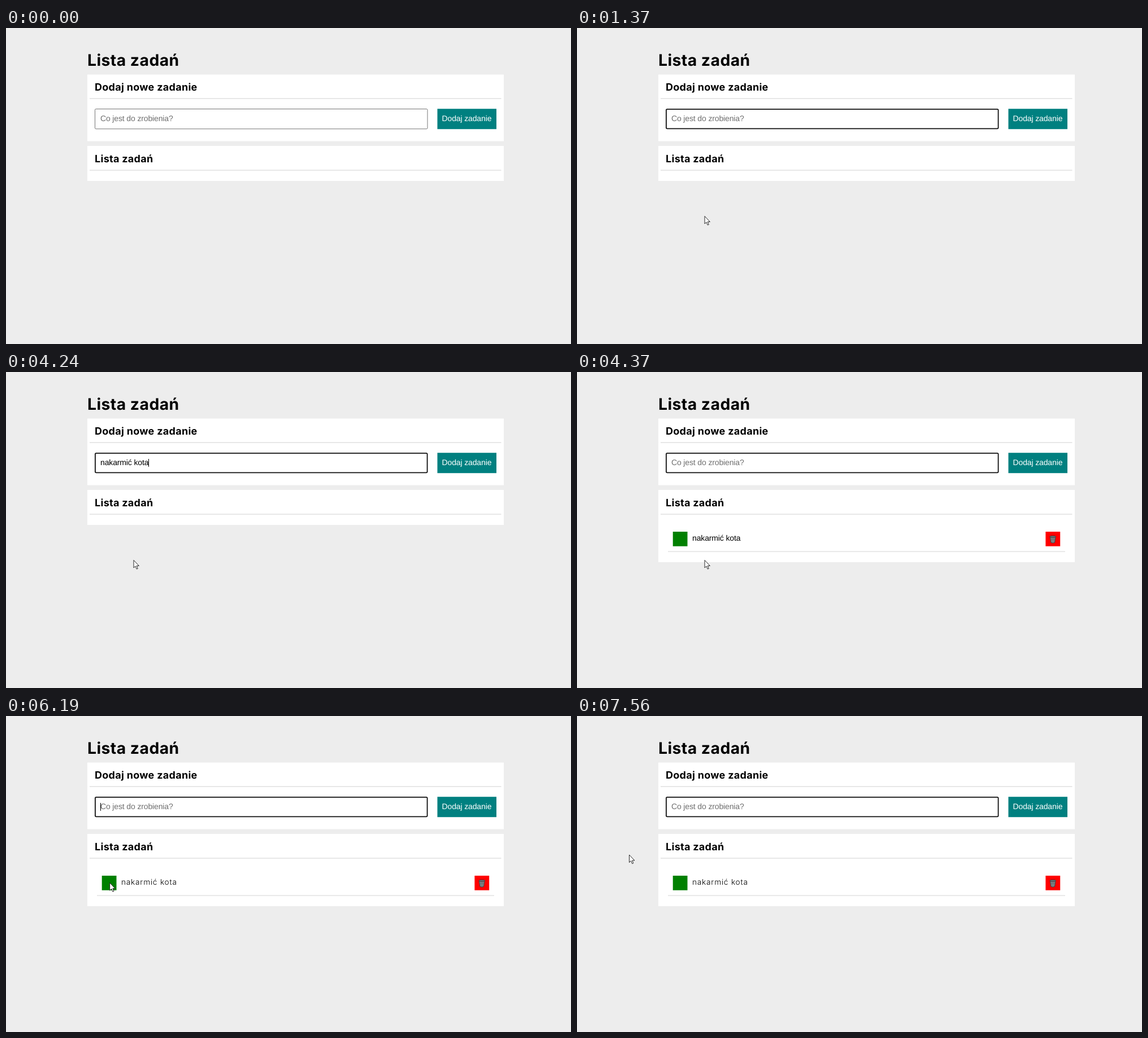
Recreate the animation shown at these times as an HTML page. Size 1000 px wide and 560 px high, loop 8 s.

```html
<!DOCTYPE html>
<html lang="pl">
<head>
<meta charset="utf-8">
<title>Lista zadań</title>
<style>
  html, body { margin: 0; width: 100%; height: 100%; overflow: hidden; background: #ededed; }
  svg { display: block; width: 1000px; height: 560px; }
  text {
    font: 14px "Liberation Sans", Arial, sans-serif; letter-spacing: -.01em;
    white-space: pre; text-rendering: geometricPrecision;
  }
  .title, .heading, .styled { font-family: Inter, "Open Sans", sans-serif; font-optical-sizing: none; }
  .title, .heading { font-weight: 700; letter-spacing: .016em; }
  .title { font-size: 28.3px; }
  .heading { font-size: 18px; }
  .styled { font-size: 13.66px; font-weight: 300; letter-spacing: .057em; }
  .rule { fill: #e4e4e4; }
  .card { fill: #fff; }
</style>
</head>
<body>
<svg viewBox="0 0 1000 560">
  <text class="title" x="144" y="67">Lista zadań</text>

  <rect class="card" x="144" y="82.5" width="737" height="118"/>
  <text class="heading" x="157" y="111">Dodaj nowe zadanie</text>
  <rect class="rule" x="148" y="124.2" width="728.5" height="1.7"/>
  <rect id="field" fill="#fff"/>
  <text id="entry" x="167" y="165"></text>
  <rect id="caret" y="154" width="1" height="14"/>
  <rect x="763.5" y="143.2" width="104.5" height="36" fill="#008080"/>
  <text x="771.6" y="165" fill="#fff">Dodaj zadanie</text>

  <rect id="list" class="card" x="144" y="209" width="737" height="62"/>
  <text class="heading" x="157" y="238.3">Lista zadań</text>
  <rect class="rule" x="148" y="251.2" width="728.5" height="1.7"/>
  <g id="task">
    <rect x="169.7" y="283" width="25.8" height="25.8" fill="#008000"/>
    <text id="label" x="204" y="299">nakarmić kota</text>
    <rect x="829.4" y="283" width="25.8" height="25.8" fill="#f00"/>
    <g stroke="#333" stroke-width=".8">
      <path d="M837.2 292 L838.8 302.2 Q842.2 304.2 845.6 302.2 L847.2 292Z" fill="#8b8f93"/>
      <path d="M839.3 294 L840.3 302.5 M842.2 294 V303 M845 294 L844.1 302.5 M838 297 H846.4" stroke="#555" stroke-width=".6"/>
      <ellipse cx="842.2" cy="292" rx="5.4" ry="1.7" fill="#6c7074"/>
    </g>
    <rect class="rule" x="161" y="317.4" width="703" height="1.7"/>
  </g>

  <g id="pointer">
    <path id="arrow" d="M.5 .5 V14 L3.5 11.2 L5.7 16.2 L7.8 15.3 L5.7 10.5 H9.9Z" fill="#fff" stroke="#111" stroke-width=".9"/>
    <path id="beam" d="M-3 -7.5 H3 M0 -7 V7 M-3 7.5 H3" fill="none" stroke="#111"/>
  </g>
</svg>
<script>
  const LOOP = 8000, BLINK = 527, FOCUS = 770, ADDED = 4370, STYLED = 4430, KEY_GAP = 70;

  // Typing comes in short bursts of evenly spaced keys.
  const bursts = [
    { start: 2040, text: 'nak' }, { start: 2630, text: 'a' }, { start: 2900, text: 'rmi' },
    { start: 3250, text: 'ć ' }, { start: 3520, text: 'kota' }
  ];

  // Each glide follows a curve in visible steps; power > 1 slows it towards the end.
  const glides = [
    glide(130, 630, 8, 'M971 583 L241 158'),
    glide(1030, 1370, 6, 'M241 158 Q240 300 225.5 333'),
    glide(5490, 6260, 12, 'M225.5 333 L229 280 Q195 244 183 296', 2),
    glide(6330, 6400, 2, 'M183 296 L178 302'),
    glide(6540, 7290, 12, 'M178 302 L245.5 251 C290 110 190 120 139 237'),
    glide(7360, 7560, 4, 'M139 237 L92 245.5')
  ];

  function glide(start, end, steps, d, power = 1) {
    const path = document.createElementNS('http://www.w3.org/2000/svg', 'path');
    path.setAttribute('d', d);
    return { start, steps, path, power, gap: (end - start) / (steps - 1) };
  }

  const $ = id => document.getElementById(id);
  const show = (id, on) => $(id).setAttribute('visibility', on ? 'inherit' : 'hidden');
  const set = (id, attrs) => {
    for (const name in attrs) $(id).setAttribute(name, attrs[name]);
  };

  function pointerAt(t) {
    const { start, gap, steps, path, power } = glides.filter(g => g.start <= t).pop();
    const step = Math.min(steps, Math.floor((t - start + 12) / gap) + 1);
    const progress = 1 - (1 - step / steps) ** power;
    return path.getPointAtLength(path.getTotalLength() * progress);
  }

  function drawPointer(t) {
    const visible = t >= glides[0].start;
    show('pointer', visible);
    if (!visible) return false;
    const { x, y } = pointerAt(t);
    const inField = x > 157 && x < 746 && y > 143 && y < 179;
    set('pointer', { transform: `translate(${x} ${y})` });
    show('arrow', !inField);
    show('beam', inField);
    return inField;
  }

  function typing(t) {
    let text = '', lastKey = FOCUS + 10;
    for (const burst of bursts) {
      [...burst.text].forEach((char, i) => {
        const time = burst.start + i * KEY_GAP;
        if (time > t) return;
        text += char;
        lastKey = time;
      });
    }
    return { text: t < ADDED ? text : '', lastKey };
  }

  function drawField(t, hovered) {
    const focused = t >= FOCUS;
    const line = focused ? 1.8 : 1;
    set('field', {
      x: 157 + line / 2, y: 143 + line / 2, width: 589.5 - line, height: 36.3 - line,
      rx: 1.8, 'stroke-width': line,
      stroke: focused ? '#101010' : hovered ? '#4f4f4f' : '#767676'
    });

    const { text, lastKey } = typing(t);
    $('entry').textContent = text || 'Co jest do zrobienia?';
    set('entry', { fill: text ? '#000' : '#6f6f6f' });

    show('caret', focused && Math.floor(Math.max(0, t - lastKey) / BLINK) % 2 === 0);
    set('caret', { x: Math.round(167 + (text ? $('entry').getComputedTextLength() : 0)) });
  }

  function drawList(t) {
    const added = t >= ADDED;
    show('task', added);
    set('list', { height: added ? 128 : 62 });
    set('label', { class: t >= STYLED ? 'styled' : '' });
  }

  const began = performance.now();
  function frame() {
    const t = (performance.now() - began) % LOOP;
    drawField(t, drawPointer(t));
    drawList(t);
    requestAnimationFrame(frame);
  }
  frame();
</script>
</body>
</html>
```
